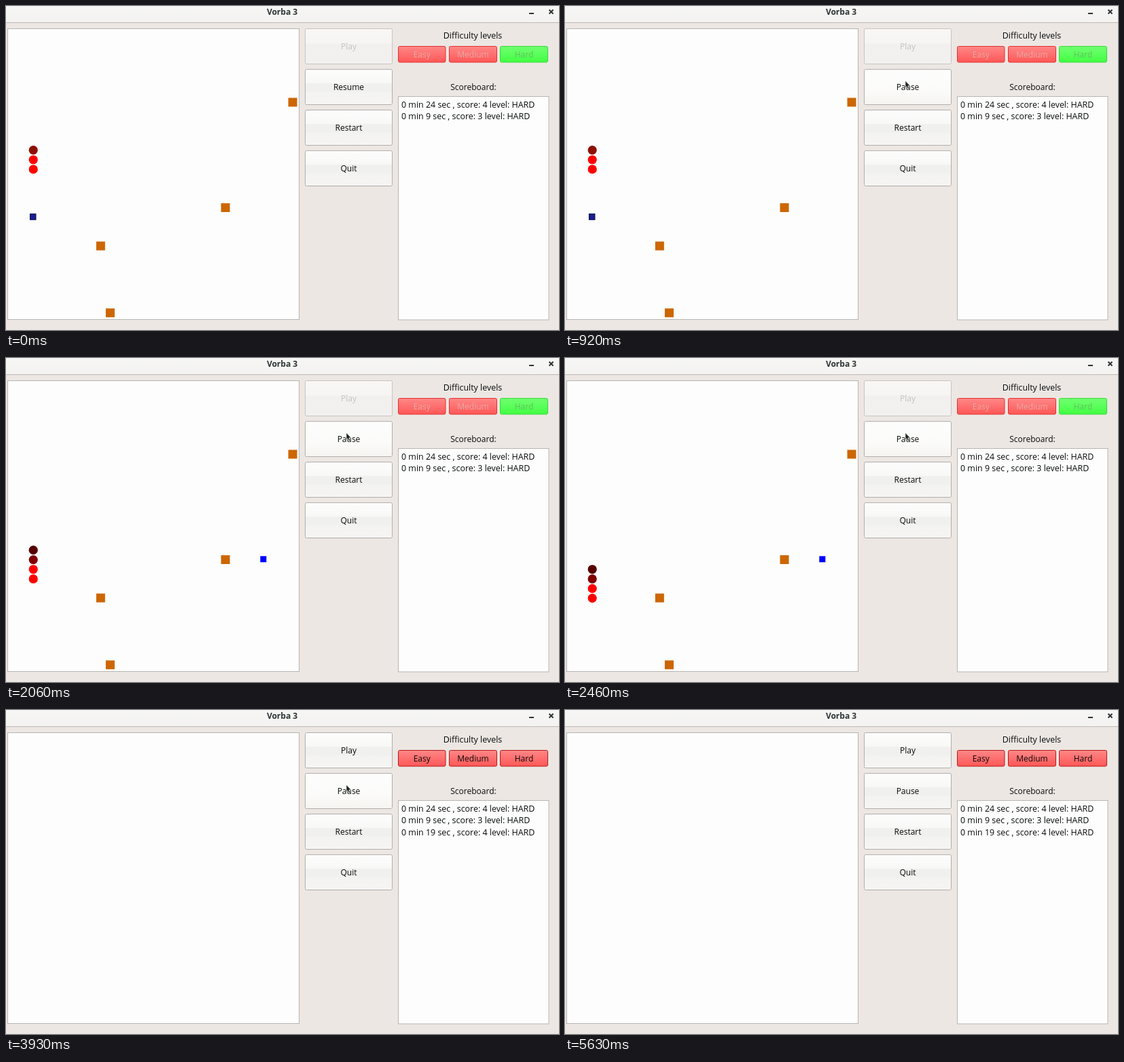
An HTML page that plays this animation: 814 px wide and 478 px high, repeating every 6.09 s.

```html
<!DOCTYPE html>
<html>
<head>
<meta charset="utf-8">
<style>
html, body { margin: 0; width: 100%; height: 100%; overflow: hidden; background: #ece7e3; }
svg { display: block; font: 12px "Open Sans", "Noto Sans", sans-serif; fill: #080a0a; }
.mid { text-anchor: middle; }
.row { font-size: 12.45px; }
.title { font-weight: 700; fill: #2e3436; }
</style>
</head>
<body>
<svg width="814" height="478" viewBox="0 0 814 478">
  <defs id="defs"></defs>
  <g id="scene"></g>
</svg>
<script>
const LOOP = 6090, OVER = 3930, CELL = 14.17;
const MOVES = [1140, 1370, 1450, 1680, 1830, 2060, 2230, 2460, 2610, 2840, 3010, 3240, 3390, 3620];
const EAT = 1830;
const TURN = 10;          // row where the snake turns right
const FADE = ["#f00", "#f00", "#800000", "#560000"];
const ROCKS = [[422, 142], [323, 297.5], [139.3, 354], [153.4, 452.7]];
const POINTER = [
  [0, null], [120, [722, 467]], [200, [688, 428]], [280, [602, 335]], [350, [538, 228]],
  [430, [507, 178]], [510, [520, 144]], [590, [503, 119]], [670, [501, 110.5]],
  [5320, [513, 124]], [5400, [603, 230]], [5480, [673, 366]], [5550, [707, 452]], [5630, null]
];

const gradient = (id, ...stops) =>
  `<linearGradient id="${id}" x2="0" y2="1">` +
  stops.map(([at, color]) => `<stop offset="${at}" stop-color="${color}"/>`).join("") +
  "</linearGradient>";

defs.innerHTML =
  gradient("bar", [0, "#f6f6f5"], [1, "#f4f3f2"]) +
  gradient("normal", [0, "#fdfdfd"], [.38, "#f8f8f7"], [.41, "#f0f0ef"], [.63, "#f0f0ef"], [.65, "#f3f3f2"], [1, "#f6f5f4"]) +
  gradient("hover", [0, "#fdfdfd"], [.6, "#fbfbfa"], [1, "#f7f4f1"]) +
  gradient("pressed", [0, "#d2cec9"], [1, "#dedad6"]) +
  gradient("off", [0, "#f8f7f6"], [.4, "#f6f5f4"], [.45, "#f2f0ee"], [1, "#f3f1ef"]) +
  gradient("red", [0, "#ff8888"], [1, "#ff5757"]) +
  gradient("green", [0, "#70ff70"], [1, "#42ff42"]);

const rect = (x, y, w, h, fill, stroke = "none", r = 0) =>
  `<rect x="${x}" y="${y}" width="${w}" height="${h}" rx="${r}" fill="${fill}" stroke="${stroke}"/>`;

const text = (x, y, str, cls = "mid", fill = "") =>
  `<text x="${x}" y="${y}" class="${cls}"${fill && ` style="fill:${fill}"`}>${str}</text>`;

const square = (x, y, size, fill, stroke) =>
  rect(x - size / 2, y - size / 2, size, size, fill, stroke);

function button(i, label, at, state) {
  const y = 33.5 + 60 * i;
  const over = at && at[0] > 440 && at[0] < 569 && at[1] > y && at[1] < y + 52;
  const off = state === "off";
  return rect(440.5, y, 128, 52, `url(#${state || (over ? "hover" : "normal")})`, off ? "#c8c3be" : "#b2aeaa", 2) +
    text(504.5, y + 30.7, label, "mid", off ? "#c4c1be" : "");
}

function level(x, w, label, on, chosen) {
  const green = !on && chosen;
  return rect(x, 59.5, w, 23.5, `url(#${green ? "green" : "red"})`, on ? "#b81818" : green ? "#36dc36" : "#e33030", 2) +
    text(x + w / 2, 75.5, label, "mid", on ? "" : green ? "#62c062" : "#e2aba5");
}

// Cell of the path: down the column, then right along the turning row
function cell(n) {
  const x = 40.2 + CELL * Math.max(0, n - TURN);
  const y = 212.6 + CELL * Math.min(n, TURN);
  return [x, y];
}

function game(t) {
  const steps = MOVES.filter(m => t >= m).length;
  const head = steps + 2;
  const length = steps > 5 ? 4 : 3;
  let out = ROCKS.map(([x, y]) => square(x, y, 13, "#cc6600")).join("");
  out += t < EAT ? square(39.7, 311, 8.5, "#1a1a96", "#0c0c40") : square(378.8, 296.8, 9, "#0000ff");
  for (let i = 0; i < length; i++) {
    const [x, y] = cell(head - i);
    const fill = i === 2 && !steps ? "#8e1004" : FADE[i];
    out += `<circle cx="${x}" cy="${y}" r="6.6" fill="${fill}"/>`;
  }
  return out;
}

function draw(t) {
  const over = t >= OVER;
  const at = POINTER.filter(p => t >= p[0]).pop()[1];
  const rows = [[24, 4], [9, 3], [19, 4]].slice(0, over ? 3 : 2);
  return rect(0, 0, 814, 478, "#ece7e3") +
    rect(0, 0, 814, 24, "url(#bar)") + rect(0, 24, 814, 1, "#bdb9b5") +
    text(406.5, 13, "Vorba 3", "mid title") +
    rect(770, 10, 7, 2, "#2e3436") +
    `<path d="M799.5 5.5l6 6m0-6l-6 6" stroke="#2e3436" stroke-width="2"/>` +
    rect(2.5, 33.5, 429, 429, "#fdfdfd", "#b9b5b1") +
    (over ? "" : game(t)) +
    button(0, "Play", at, over ? "" : "off") +
    button(1, t < 920 ? "Resume" : "Pause", at, t >= 750 && t < 920 ? "pressed" : "") +
    button(2, "Restart", at) +
    button(3, "Quit", at) +
    text(687, 48, "Difficulty levels", "mid row") +
    level(577.5, 69.5, "Easy", over) +
    level(652.5, 70, "Medium", over) +
    level(727.5, 70, "Hard", over, true) +
    text(688, 123.5, "Scoreboard:") +
    rect(577.5, 133.5, 221.5, 329.5, "#fdfdfd", "#b9b5b1") +
    rows.map(([sec, score], i) =>
      text(582, 150 + 17.3 * i, `0 min ${sec} sec , score: ${score} level: HARD`, "row")).join("") +
    (at ? `<path transform="translate(${at})" d="M0 0v10l2.2-2 1.8 4 1.8-.8-1.8-3.9h3z" fill="#1c2420" stroke="#fff" stroke-width=".5"/>` : "");
}

let shown = "";
function tick() {
  const next = draw(performance.now() % LOOP);
  if (next !== shown) scene.innerHTML = shown = next;
  requestAnimationFrame(tick);
}
tick();
</script>
</body>
</html>
```
